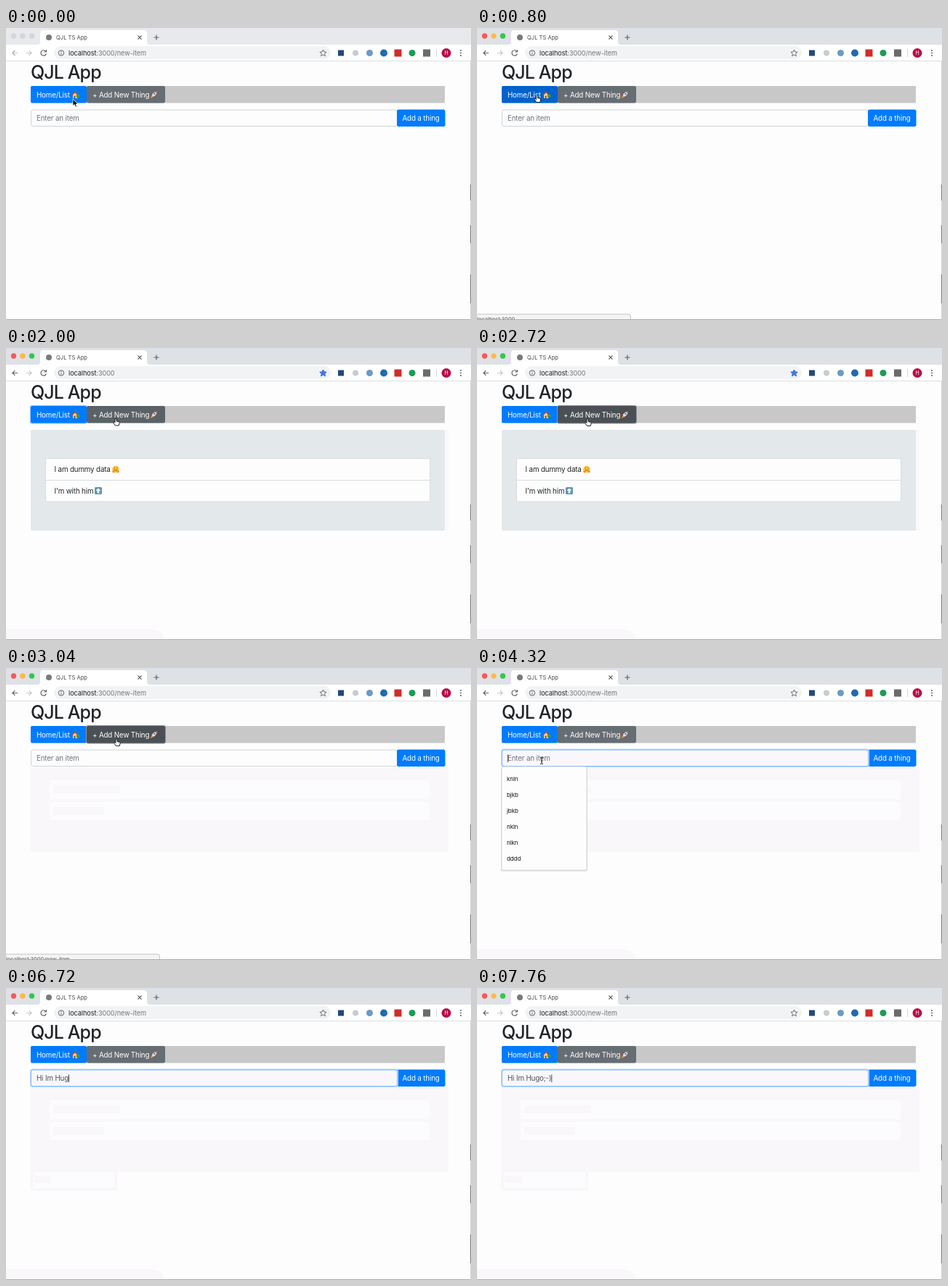
These frames come from a looping animation (640 px wide and 403 px high, 8 s). An HTML page:

```html
<!DOCTYPE html>
<html lang="en">
<head>
<meta charset="utf-8">
<title>QJL TS App</title>
<style>
  html, body { margin: 0; width: 100%; height: 100%; overflow: hidden; background: #fdfdfd; }
  svg { display: block; width: 640px; height: 403px; }
  text { font-family: Inter, Roboto, sans-serif; font-size: 9.8px; letter-spacing: -.16px; fill: #212529; white-space: pre; }
  .h1 { font-size: 25px; font-weight: 500; letter-spacing: -.9px; }
  .tab { font-size: 7.6px; letter-spacing: 0; fill: #45494d; }
  .url { font-size: 9.2px; letter-spacing: -.1px; fill: #202124; }
  .url tspan { fill: #75797d; }
  .light { fill: #fff; }
  .hint { fill: #6c757d; }
  .small { font-size: 8px; letter-spacing: -.1px; fill: #111; }
  .status { font-size: 7.4px; letter-spacing: 0; fill: #555; }
  .line { fill: none; stroke: #5f6368; stroke-width: 1.2; }
  .dim { stroke: #c3c6c9; }
  .ghost { fill: #f9f7fa; }
  .trace { fill: #fcfbfd; }
</style>
</head>
<body>
<svg viewBox="0 0 640 403">
  <defs>
    <g id="house">
      <path d="M0 5 4 1 8 5V10H1V5Z" fill="#f0d5a0"/>
      <path d="M-.5 5 4 .5 8.5 5 7.5 6 4 2.5 .5 6Z" fill="#b5482f"/>
      <path d="M2.5 6.5h2V10h-2Z" fill="#87512e"/>
      <circle cx="8" cy="7" r="2.4" fill="#4f9a35"/>
      <path d="M7.5 8h1v2h-1Z" fill="#7a4a25"/>
    </g>
    <g id="rocket">
      <path d="M2 4 0 6 3 6ZM6 7 5 10 3.500 7Z" fill="#d8322e"/>
      <path d="M2 6Q4 1 9.500 .5 9 6 4 8Z" fill="#d9dde1"/>
      <path d="M7 1 9.500 .5 9 3Z" fill="#d8322e"/>
      <circle cx="6" cy="3.800" r="1.100" fill="#37658d"/>
      <path d="M2 6.500 4 8.300 0 10Z" fill="#f5a623"/>
    </g>
    <g id="hug">
      <circle cx="5" cy="4.800" r="4.800" fill="#fcc33c"/>
      <path d="M2.500 3.700q.7-1.200 1.400 0M6 3.700q.7-1.200 1.400 0M3 5.500q2 2 4 0" fill="none" stroke="#76451c" stroke-width=".8"/>
      <circle cx="2" cy="8" r="1.800" fill="#f0962a"/>
      <circle cx="8" cy="8" r="1.800" fill="#f0962a"/>
    </g>
    <g id="up">
      <rect width="10" height="10" rx="1.500" fill="#5f96b8"/>
      <path d="M5 1.500 8.500 5H6.300V8.500H3.700V5H1.500Z" fill="#fff"/>
    </g>
  </defs>

  <!-- browser frame -->
  <rect width="640" height="23" fill="#dee1e6"/>
  <rect width="640" height="23" fill="#e7e9ec" data-show="0-480"/>
  <path d="M43 23q4 0 4-4V7q0-4 4-4H190q4 0 4 4V19q0 4 4 4Z" fill="#fff"/>
  <rect y="23" width="640" height="22" fill="#fff"/>
  <path d="M0 45.500H640" stroke="#dcdee0"/>
  <g data-show="0-480" fill="#d3d5d9"><circle cx="10.500" cy="11" r="3.700"/><circle cx="23" cy="11" r="3.700"/><circle cx="35.500" cy="11" r="3.700"/></g>
  <g data-show="480-8000"><circle cx="10.500" cy="11" r="3.700" fill="#fc5753"/><circle cx="23" cy="11" r="3.700" fill="#fdbc40"/><circle cx="35.500" cy="11" r="3.700" fill="#33c748"/></g>
  <circle cx="59" cy="13" r="4" fill="#777b7f"/>
  <text class="tab" x="69" y="15.700">QJL TS App</text>
  <path class="line" d="M181.500 10.500l5 5m0-5l-5 5M203.500 13h7m-3.500-3.500v7"/>
  <path class="line" d="M16 34.500H9m3.300-3.300L9 34.500l3.300 3.300"/>
  <path class="line dim" d="M16 34.500H9m3.300-3.300L9 34.500l3.300 3.300" data-show="0-480"/>
  <path class="line dim" d="M28 34.500h7m-3.300-3.300 3.300 3.300-3.300 3.300"/>
  <path class="line" d="M54.500 32a3.700 3.700 0 1 0 .8 3.500M55.500 30v3h-3"/>
  <rect x="66" y="25" width="381" height="18" rx="9" fill="#f1f3f4"/>
  <g class="line"><circle cx="76" cy="34.500" r="3.700" stroke-width="1"/><path d="M76 34v2.500M76 32v1" stroke-width="1"/></g>
  <text class="url" x="86" y="37.500">localhost<tspan>:3000</tspan><tspan data-show="0-960 2880-8000">/new-item</tspan></text>
  <path id="star" d="M436.500 30l1.300 3 3.300.3-2.500 2.200.8 3.200-2.900-1.700-2.900 1.700.8-3.200-2.500-2.200 3.300-.3Z" class="line" style="stroke-width:.9"/>
  <path d="M436.500 30l1.300 3 3.300.3-2.500 2.200.8 3.200-2.900-1.700-2.900 1.700.8-3.200-2.500-2.200 3.300-.3Z" fill="#3b78e7" stroke="#3b78e7" data-show="960-2880"/>
  <rect x="457" y="30.500" width="8" height="8" fill="#24487c"/>
  <circle cx="481" cy="34.500" r="4" fill="#c9cccf"/>
  <circle cx="500.500" cy="34.500" r="4.500" fill="#6d9ac2"/>
  <circle cx="520" cy="34.500" r="5" fill="#1e6bb5"/>
  <rect x="534.500" y="29.500" width="10" height="10" fill="#d12d2a"/>
  <circle cx="559" cy="34.500" r="4.500" fill="#1d9c55"/>
  <rect x="574" y="29.500" width="10" height="10" fill="#6b6b6b"/>
  <path d="M592.500 29v11" stroke="#d5d7da"/>
  <circle cx="606" cy="34.500" r="6.500" fill="#b80d48"/>
  <text class="light" x="606" y="37" text-anchor="middle" style="font-size:7px">H</text>
  <g fill="#5f6368"><circle cx="626" cy="31" r="1"/><circle cx="626" cy="34.500" r="1"/><circle cx="626" cy="38" r="1"/></g>

  <!-- page -->
  <text class="h1" x="34" y="70">QJL App</text>
  <rect x="34" y="80" width="570" height="23.500" fill="#c8c8c8"/>
  <rect x="33" y="79" width="79" height="25.500" rx="3" fill="#8fc0fb" data-show="880-2720"/>
  <rect id="home" x="34" y="80" width="77" height="23.500" rx="2.500"/>
  <text class="light" x="42" y="95.500">Home/List</text>
  <use href="#house" x="91" y="87"/>
  <rect x="110" y="79" width="110" height="25.500" rx="3" fill="#8d9296" data-show="2720-4160"/>
  <rect id="add" x="111" y="80" width="108" height="23.500" rx="2.500"/>
  <text class="light" x="119" y="95.500">+ Add New Thing</text>
  <use href="#rocket" x="198.500" y="87"/>

  <g data-show="960-2880">
    <rect x="34" y="113" width="575" height="139" fill="#f9f8fb"/>
    <rect x="34" y="113" width="570" height="139" rx="2.500" fill="#e3e8ea"/>
    <rect x="54.500" y="152.500" width="529" height="59.500" rx="2" fill="#fdfdfd" stroke="#d9dddf"/>
    <path d="M54.500 182.500H583.500" stroke="#d9dddf"/>
    <text x="66.500" y="171">I am dummy data</text><use href="#hug" x="146" y="162.500"/>
    <text x="66.500" y="201">I'm with him</text><use href="#up" x="122" y="192"/>
  </g>

  <g data-show="2880-8000">
    <path class="ghost" d="M34 137H609V254H34Z"/>
    <path class="trace" d="M60 155H583V181H60ZM60 185H583V210H60Z"/>
    <path class="ghost" d="M65 162H157V173H65ZM65 192H135V203H65Z"/>
  </g>
  <g data-show="4640-8000">
    <path class="ghost" d="M33 254H153V280H33Z"/>
    <path class="trace" d="M38 254H149V276H38Z"/>
    <path class="ghost" d="M40 259H62V269H40Z"/>
  </g>
  <g data-show="0-960 2880-8000">
    <rect x="34.500" y="113" width="504" height="22.500" rx="2.500" fill="#fdfdfd" stroke="#ced4da"/>
    <rect x="538" y="112.500" width="66.500" height="23.500" rx="2.500" fill="#007bff"/>
    <text class="light" x="545.500" y="128">Add a thing</text>
    <g data-show="4160-8000">
      <rect x="34" y="112.500" width="505" height="23.500" rx="3" fill="#f9f7fb" stroke="#b9d8fb" stroke-width="2"/>
      <rect x="34.500" y="113" width="504" height="22.500" rx="2.500" fill="none" stroke="#80bdff"/>
      <path id="caret" d="M.5 119.500v10.500" stroke="#333" stroke-width=".9"/>
    </g>
    <text class="hint" x="42" y="128" data-show="0-4560">Enter an item</text>
    <text id="typed" x="42" y="128" style="fill:#495057"></text>
  </g>
  <g id="menu" data-show="4160-4640">
    <rect x="33" y="137" width="119" height="143.500" rx="2" fill="#dcdcde"/>
    <rect x="34" y="136" width="117" height="143" rx="2" fill="#fdfdfd" stroke="#c9cacc" stroke-width=".6"/>
  </g>

  <!-- status bubble -->
  <path class="ghost" d="M0 388H200q18 1 18 15H0Z" data-show="1760-2880 3680-8000"/>
  <g data-show="720-1760 2880-3680">
    <path d="M-1 395H208.500q3 0 3 3V404H-1Z" fill="#f4f4f5" stroke="#c2c4c6"/>
    <text class="status" x="0" y="404.500">localhost:3000<tspan data-show="2880-3680">/new-item</tspan></text>
  </g>
  <path d="M0 402.500H640" stroke="#a9abad"/>
  <path d="M639.500 46V403" stroke="#d3d4d6"/>
  <path d="M639.500 216v22M639.500 272v25M639.500 340v40" stroke="#77797b"/>

  <g id="cursor" stroke-linejoin="round">
    <path d="M0 0V9.500L2.200 7.500 3.800 11 5.500 10.200 4 7H7Z" fill="#000" stroke="#fff" stroke-width=".8" data-show="0-560"/>
    <path d="M-1 .8q1-1.200 2 0V4l3.300.8q1 .4.800 1.700L4.300 10H-.8L-3.300 6q0-1.500 1.500-.8L-1 6Z" fill="#fff" stroke="#111" stroke-width=".9" data-show="560-3520"/>
    <path d="M-2-4.500q2 0 2 1 0-1 2-1M0-3.500v7M-2 4.500q2 0 2-1 0 1 2 1M-1 1h2" fill="none" stroke="#222" stroke-width="1" data-show="3520-4560"/>
  </g>
</svg>
<script>
  const LOOP = 8000;
  const $ = id => document.getElementById(id);
  const message = 'Hi Im Hugo;-)';
  const keyTimes = [4560, 5040, 5440, 5680, 5840, 6080, 6400, 6560, 6720, 6880, 7120, 7520, 7760];
  const path = [
    [80, 92, 98], [480, 82.5, 92.5], [1760, 82.5, 92.5], [2000, 151, 97],
    [2640, 152, 97.5], [3360, 152, 97.5], [3680, 94, 130], [3920, 94, 130], [4000, 89, 128]
  ];

  ['knln', 'bjkb', 'jbkb', 'nkln', 'nlkn', 'dddd'].forEach((word, i) => {
    const row = document.createElementNS('http://www.w3.org/2000/svg', 'text');
    row.setAttribute('class', 'small');
    row.setAttribute('x', 41);
    row.setAttribute('y', 155.7 + 22 * i);
    row.textContent = word;
    $('menu').append(row);
  });

  const timed = [...document.querySelectorAll('[data-show]')].map(el => ({
    el, spans: el.dataset.show.split(' ').map(s => s.split('-').map(Number))
  }));

  const within = (t, [from, to]) => t >= from && t < to;

  function cursorAt(t) {
    const i = path.findIndex(p => p[0] > t);
    if (i === 0) return path[0].slice(1);
    if (i < 0) return path.at(-1).slice(1);
    const [a, b] = [path[i - 1], path[i]];
    const k = (t - a[0]) / (b[0] - a[0]);
    const ease = k * k * (3 - 2 * k);
    return [1, 2].map(n => a[n] + (b[n] - a[n]) * ease);
  }

  function draw(t) {
    for (const { el, spans } of timed)
      el.style.display = spans.some(s => within(t, s)) ? '' : 'none';

    $('home').style.fill = within(t, [560, 1880]) ? '#0062cc' : '#007bff';
    $('add').style.fill = within(t, [2720, 3520]) ? '#4a5055'
      : within(t, [1880, 2720]) ? '#5a6268' : '#666d73';

    const count = keyTimes.filter(k => k <= t).length;
    $('typed').textContent = message.slice(0, count);
    const width = count ? $('typed').getComputedTextLength() : 0;
    $('caret').setAttribute('transform', `translate(${42 + width})`);
    $('cursor').setAttribute('transform', `translate(${cursorAt(t)})`);
  }

  function tick() {
    draw(performance.now() % LOOP);
    requestAnimationFrame(tick);
  }
  tick();
</script>
</body>
</html>
```
